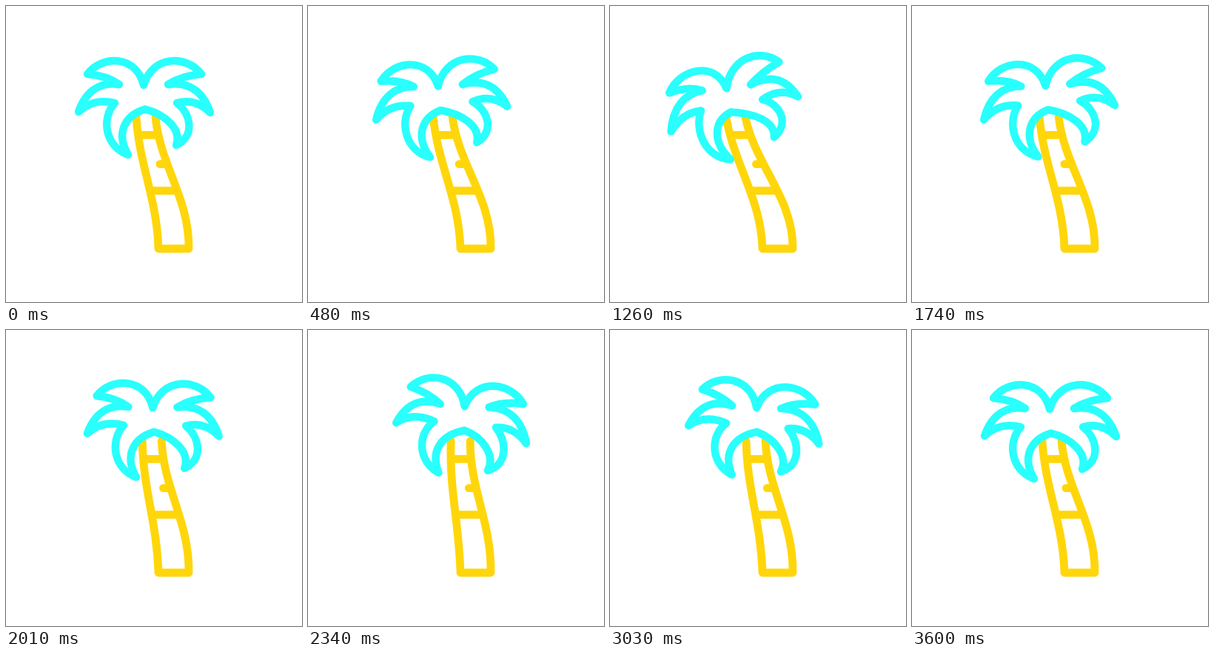
Recreate the animation shown at these times as an HTML page. Size 400 px wide and 400 px high, loop 3.63 s.

```html
<!DOCTYPE html>
<html lang="en">
<head>
<meta charset="utf-8">
<title>Swaying palm</title>
<style>
  html, body { margin: 0; width: 100%; height: 100%; overflow: hidden; background: #fff; }
  svg { display: block; width: 100%; height: 100%; }
  path { fill: none; stroke-linecap: round; stroke-linejoin: round; }
</style>
</head>
<body>
<svg viewBox="0 0 400 400">
  <path id="trunk" stroke="#ffd60a" stroke-width="10.8"/>
  <path id="crown" stroke="#29fffc" stroke-width="10.4"/>
</svg>
<script>
const LOOP = 3630, STEP = 30, END = 3600;
const trunk = document.getElementById('trunk');
const crown = document.getElementById('crown');

// Upright crown, leaf by leaf, anticlockwise from the notch at the top
const HUB = { x: 186, y: 107 };
const LEAVES = `M186 107
  C176 66 130 66 110 92 Q136 94 153 106
  C128 102 108 114 98 143 Q118 124 147 131
  C128 152 134 190 165 201 C148 172 160 148 188 139.5
  C214 146 238 166 230 188 C256 176 250 146 231 131
  Q256 124 276 144 C266 114 246 102 219 106
  Q238 94 264 92 C244 66 198 66 186 107Z`;

// Bézier x values of the upright trunk edges, sharing one set of y values
const LEFT = [176, 180, 204, 206], RIGHT = [202, 208, 248, 247];
const HEIGHTS = [150, 215, 260, 328];
const BEND = [0.67, 0.42, 0, 0];

// [ms, value] pairs, eased from one to the next
const SWAY = [[0, 0], [1200, -29], [2400, 26], [END, 0]];
const TILT = [[0, 0], [1150, -16.2], [2650, 11.8], [END, 0]];

function track(keys, time) {
  const next = Math.max(1, keys.findIndex(key => key[0] >= time));
  const [t0, from] = keys[next - 1], [t1, to] = keys[next];
  const t = (time - t0) / (t1 - t0);
  return from + (to - from) * t * t * (3 - 2 * t);
}

const bezier = ([a, b, c, d], t) => {
  const u = 1 - t;
  return a * u ** 3 + 3 * b * u * u * t + 3 * c * u * t * t + d * t ** 3;
};

function trunkPath(sway) {
  const [left, right] = [LEFT, RIGHT].map(edge => edge.map((x, i) => x + sway * BEND[i]));
  const side = edge => 'M' + edge.map((x, i) => `${i === 1 ? 'C' : ''}${x} ${HEIGHTS[i]}`).join(' ');
  const rung = (t, from = bezier(left, t)) =>
    `M${from} ${bezier(HEIGHTS, t)}H${bezier(right, t)}`;
  const knot = 0.355;
  return side(left) + `H${right[3]}` + side(right)
    + rung(0.13) + rung(0.57) + rung(knot, bezier(right, knot) - 10);
}

// The leaves turn around the hub, more at the tips than near the middle
function crownPath(sway, tilt) {
  return LEAVES.replace(/([\d.]+) ([\d.]+)/g, (_, px, py) => {
    const x = px - HUB.x, y = py - HUB.y;
    const angle = tilt * Math.PI / 180 * Math.min(1, Math.hypot(x, y) / 75);
    const cos = Math.cos(angle), sin = Math.sin(angle);
    return `${HUB.x + sway + x * cos - y * sin} ${HUB.y - sway * 0.15 + x * sin + y * cos}`;
  });
}

function tick() {
  const now = performance.now() % LOOP;
  const time = Math.min(Math.floor(now / STEP) * STEP, END);
  const sway = track(SWAY, time);
  trunk.setAttribute('d', trunkPath(sway));
  crown.setAttribute('d', crownPath(sway, track(TILT, time)));
  requestAnimationFrame(tick);
}
tick();
</script>
</body>
</html>
```
